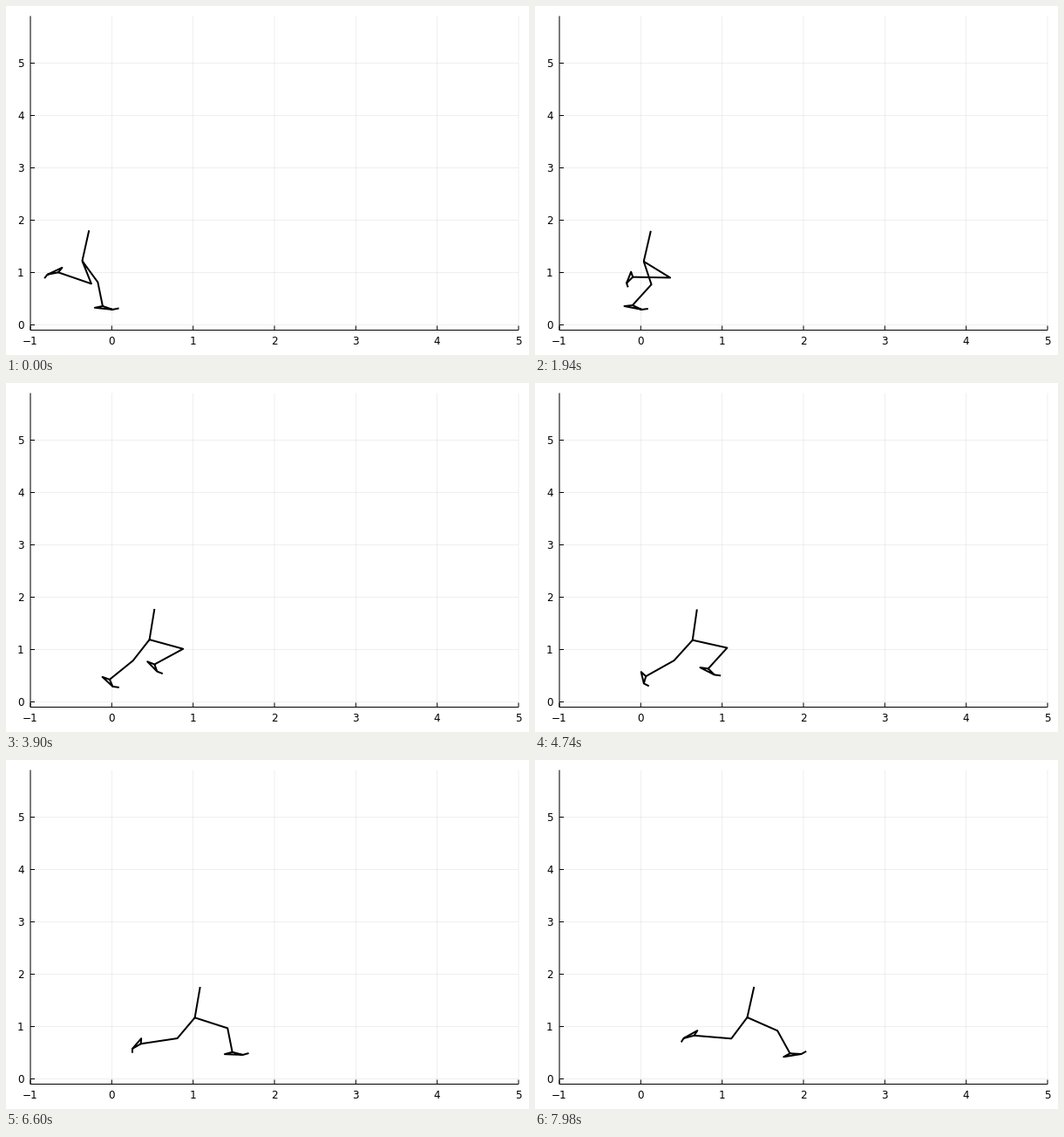
Animation, 600 px wide and 400 px high, one loop 8 s. Source, as a matplotlib script:

```python
import numpy as np
from numpy import cos, pi, sin
import matplotlib.pyplot as plt
from matplotlib.animation import FuncAnimation

W, H, DPI = 600, 400, 100
PX = 72 / DPI  # one pixel in points
TICK_MS, TICKS = 20, 400
LAST_STEP = 171
LIFT_STEP = 83  # the planted foot starts to rise here

# Segment lengths of the walker, in axis units
TORSO, THIGH, SHANK = 0.59, 0.45, 0.46
SOLE, INSTEP, TOE = 0.224, 0.14, 0.08
INSTEP_ANGLE, TOE_ANGLE = 19, 27


def step_at(tick):
    """Steps come in threes, held for 1, 1 and 5 ticks."""
    group, r = divmod(tick + 1, 7)
    return 3 * group + min(r, 2) - 1


def ray(length, degrees):
    a = np.radians(degrees)
    return length * np.array([cos(a), sin(a)])


def bend_knee(hip, ankle):
    """Knee in front of the line from hip to ankle."""
    d = ankle - hip
    dist = np.hypot(*d)
    along = (THIGH**2 - SHANK**2 + dist**2) / (2 * dist)
    out = np.sqrt(max(THIGH**2 - along**2, 0))
    return hip + (along * d + out * np.array([-d[1], d[0]])) / dist


def leg(hip, ankle, ball, sole, toe):
    gap = np.array([np.nan, np.nan])
    return [gap, hip, bend_knee(hip, ankle), ankle, ball + ray(SOLE, sole),
            ball, ball + ray(TOE, toe), gap, ankle, ball]


def pose(step):
    s = step / LAST_STEP

    # Body: a steady glide that sinks a little
    hip = np.array([
        -0.363 + 1.672 * s + 0.007 * sin(pi * s) - 0.008 * sin(3 * pi * s),
        1.196 + 0.026 * cos(1.2 * pi * s)])
    torso = 83 - 1.8 * cos(2 * pi * (s - 0.14))

    # Rear leg: stands on the ball of the foot, rolls over it and lifts
    lift = max(step - LIFT_STEP, 0) / (LAST_STEP - LIFT_STEP)
    ball1 = np.array([0.012 + 0.515 * lift**1.89, 0.293 + 0.483 * lift**1.33])
    sole1 = (106 + 65 * cos(pi * s) + 15 * sin(pi * s)
             - 4 * sin(4 * pi * s))
    ankle1 = ball1 + ray(INSTEP, sole1 - INSTEP_ANGLE)
    push = 18 * np.exp(-((step - 92) / 30)**2)
    toe1 = sole1 - 180 + TOE_ANGLE + push

    # Front leg: swings forward and down
    ankle2 = np.array([
        -0.657 + 2.491 * s - 0.055 * sin(2 * pi * s)
        + 0.022 * sin(3 * pi * s),
        0.725 + 0.258 * cos(pi * s) + 0.02 * cos(2 * pi * s)])
    sole2 = 36 + 158 * s + 10 * sin(pi * s) - 5 * sin(2 * pi * s)
    ball2 = ankle2 - ray(INSTEP, sole2 - INSTEP_ANGLE)
    toe2 = sole2 - 180 + TOE_ANGLE

    path = [hip + ray(TORSO, torso), hip]
    path += leg(hip, ankle1, ball1, sole1, toe1)
    path += leg(hip, ankle2, ball2, sole2, toe2)
    return np.array(path).T


plt.rcParams["font.family"] = "DejaVu Sans"
fig = plt.figure(figsize=(W / DPI, H / DPI), dpi=DPI, facecolor="white")
ax = fig.add_axes([28 / W, 28.5 / H, 560 / W, 360 / H])
X0, X1, Y0, Y1 = -1, 5, -0.1, 5.9
ax.set_xlim(X0, X1)
ax.set_ylim(Y0, Y1)
ax.set_xticks(range(-1, 6))
ax.set_yticks(range(6))
ax.spines[:].set_visible(False)
ax.tick_params(length=0, labelsize=12 * PX)
ax.tick_params(axis="x", pad=6.5 * PX)
ax.tick_params(axis="y", pad=7.5 * PX)


def rule(xs, ys, width=1, **style):
    ax.plot(xs, ys, color="black", lw=width * PX, snap=False, clip_on=False,
            solid_capstyle="butt", **style)


GRID = dict(width=0.6, alpha=0.1, zorder=1)
TICK_X, TICK_Y = 5 * 6 / 560, 5 * 6 / 360  # five pixels in axis units
for x in range(-1, 6):
    rule([x, x], [Y0, Y1], **GRID)
    rule([x, x], [Y0, Y0 + TICK_Y])
for y in range(6):
    rule([X0, X1], [y, y], **GRID)
    rule([X0, X0 + TICK_X], [y, y])
rule([X0, X1], [Y0, Y0])
rule([X0, X0], [Y0, Y1])

walker, = ax.plot([], [], color="black", lw=2 * PX, solid_capstyle="butt",
                  solid_joinstyle="round", zorder=3)


def draw(tick):
    walker.set_data(*pose(step_at(tick)))
    return walker,


anim = FuncAnimation(fig, draw, frames=TICKS, interval=TICK_MS,
                     repeat=True, repeat_delay=0)
plt.show()
```
